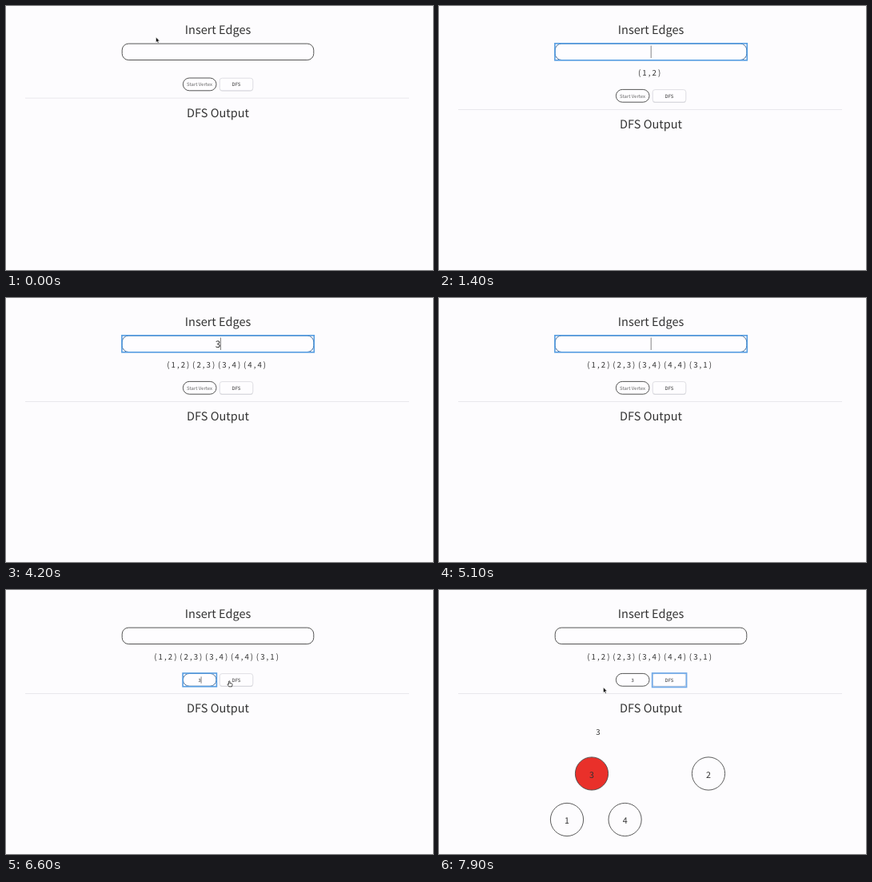
Recreate the animation shown at these times as an HTML page. Size 534 by 330 pixels, loop 8000 ms.

```html
<!DOCTYPE html>
<html lang="en">
<head>
<meta charset="utf-8">
<title>DFS demo</title>
<style>
html, body { margin: 0; width: 100%; height: 100%; overflow: hidden; background: #fdfcfe; }
svg { display: block; width: 100vw; height: 100vh; }
text {
  font-family: "Noto Sans CJK JP", "Noto Sans CJK SC", "Noto Sans CJK", "Open Sans", sans-serif;
  fill: #333; text-anchor: middle; white-space: pre; text-rendering: geometricPrecision;
}
.title { font-size: 14.5px; font-weight: 300; }
.small { font-size: 5.95px; }
.typed { font-size: 11.95px; text-anchor: start; }
.edge { font-size: 9.7px; letter-spacing: 2.05px; text-anchor: start; }
.node text { font-size: 10.7px; }
.node circle { fill: #fdfcfe; stroke: #4a4a4a; stroke-width: .9; }
.field { fill: #fefdff; stroke: #555; stroke-width: 1; }
.focus { stroke: #476f9d; }
.ring { fill: none; stroke: #559de2; stroke-width: 1.6; }
.caret { stroke: #777; stroke-width: .9; }
</style>
</head>
<body>
<svg viewBox="0 0 534 330">
  <text class="title" x="265" y="34.5">Insert Edges</text>
  <rect id="edgeField" class="field" x="145.2" y="47.1" width="239.6" height="20.4" rx="8"/>
  <rect id="edgeRing" class="ring" x="144.9" y="46.8" width="240.4" height="21"/>
  <text id="typed" class="typed" y="61.9"></text>
  <line id="edgeCaret" class="caret" y1="49.5" y2="65"/>
  <g id="edges"></g>

  <g id="lower">
    <rect id="startField" class="field" x="221.4" y="104.4" width="41.6" height="15.8" rx="7.8"/>
    <rect id="startRing" class="ring" x="221.1" y="104" width="42.3" height="16.7"/>
    <text id="startText" class="small" x="242.1" y="114.7"></text>
    <line id="startCaret" class="caret" y1="108.3" y2="116.7"/>
    <rect x="267.2" y="105.4" width="41.6" height="15.6" rx="3" fill="#d9d9de"/>
    <rect x="267.2" y="104.6" width="41.6" height="15.5" rx="3" fill="#fefdff" stroke="#d8d8dd" stroke-width=".8"/>
    <rect id="buttonRing" class="ring" x="266.7" y="104" width="42.8" height="17.4" style="stroke:#73abe8;stroke-width:1.8"/>
    <text class="small" x="288" y="114.7" style="font-weight:500">DFS</text>
    <line x1="24" x2="504" y1="129.5" y2="129.5" stroke="#e9e8ec"/>
    <text class="title" x="265" y="153">DFS Output</text>
  </g>

  <g id="graph">
    <text id="visited" x="199" y="180.6" style="font-size:9.6px">3</text>
  </g>

  <g id="pointer">
    <path id="arrow" d="M0 0V6.6L1.5 5.2 2.6 7.7 3.7 7.2 2.6 4.8H4.7Z" fill="#111" stroke="#fff" stroke-width=".5"/>
    <path id="beam" d="M-1.5-4Q0-4 0-3Q0-4 1.5-4M0-3V3M-1.5 4Q0 4 0 3Q0 4 1.5 4" fill="none" stroke="#222" stroke-width=".8"/>
    <path id="hand" d="M-.7 4.4V.5Q0-.4.7.5V2.8L3.2 3.4Q4 3.7 3.8 4.8L3.1 7.2H-.4L-2.3 4.6Q-2.2 3.6-1.4 3.9Z" fill="#fff" stroke="#222" stroke-width=".8"/>
  </g>
</svg>
<script>
const LOOP = 8000, TICK = 100, MID = 265;
const $ = id => document.getElementById(id);
const show = (id, on) => { $(id).style.display = on ? "" : "none"; };

function add(parent, tag, attrs, text = "") {
  const el = document.createElementNS("http://www.w3.org/2000/svg", tag);
  for (const k in attrs) el.setAttribute(k, attrs[k]);
  el.textContent = text;
  parent.append(el);
  return el;
}

// [time, text in the edge field]; "" after a pair means Enter
const typing = [
  [800, ""], [1000, "1"], [1100, "1 "], [1200, "1 2"], [1400, ""],
  [1600, "2"], [1700, "2 "], [1800, "2 3"], [1900, ""],
  [2100, "3"], [2400, "3 "], [2500, "3 4"], [2600, ""],
  [2700, "4"], [2800, "4 "], [3200, "4 4"], [3400, ""],
  [4200, "3"], [4600, "3 "], [4800, "3 1"], [5100, ""]
];
const enters = typing.filter((k, i) => i && k[1] === "");
const pairs = ["(1,2)", "(2,3)", "(3,4)", "(4,4)", "(3,1)"];
const PITCH = 31.9;

// [time, x, y, shape]
const moves = [
  [0, 187.5, 39, "arrow"], [200, 178, 40, "arrow"], [300, 167, 44, "arrow"],
  [400, 190, 52, "beam"], [500, 228, 53, "beam"], [600, 249, 54, "beam"],
  [1000, 0, 0, ""],
  [5400, 249, 57, "beam"], [5500, 247, 76, "arrow"], [5600, 244, 96, "arrow"],
  [5700, 242, 109, "beam"], [6300, 251, 112, "beam"], [6400, 262, 114, "beam"],
  [6500, 272, 114, "hand"], [6600, 279.3, 113.6, "hand"], [6700, 290, 114, "hand"],
  [6800, 302, 114, "hand"], [7300, 298, 114, "hand"], [7400, 288, 116, "hand"],
  [7500, 268, 120, "hand"], [7600, 245, 123, "arrow"], [7700, 226, 124, "arrow"],
  [7800, 213, 123, "arrow"], [7900, 205.5, 121.8, "arrow"]
];

const FOCUS_START = 6000, START_KEY = 6300, CLICK = 6900, VISIT = 7300;

const edges = pairs.map(p => add($("edges"), "text", { class: "edge", y: 87.4 }, p));
const discs = [[191, 229.5, 3], [337, 229.5, 2], [160, 287, 1], [232.6, 287, 4]].map(([x, y, n]) => {
  const g = add($("graph"), "g", { class: "node" });
  const disc = add(g, "circle", { cx: x, cy: y, r: 20.6 });
  add(g, "text", { x, y: y + 5 }, n);
  return disc;
});

const last = (list, t) => list.filter(k => k[0] <= t).pop();
const blink = (t, since) => (t - since) % 900 < 400;

function drawCaret(id, on, x) {
  show(id, on);
  $(id).setAttribute("x1", x);
  $(id).setAttribute("x2", x);
}

function drawEdgeField(t) {
  const focused = t >= 800 && t < FOCUS_START;
  const [since, text] = last(typing, t) || [0, ""];
  const width = [...text].reduce((w, c) => w + (c === " " ? 2.68 : 6.63), 0);
  $("edgeField").classList.toggle("focus", focused);
  show("edgeRing", focused);
  $("typed").textContent = text;
  $("typed").setAttribute("x", MID - width / 2);
  drawCaret("edgeCaret", focused && blink(t, since), MID + width / 2 + .2);

  const count = enters.filter(k => k[0] <= t).length;
  edges.forEach((el, i) => {
    el.style.display = i < count ? "" : "none";
    el.setAttribute("x", MID - count * PITCH / 2 + i * PITCH);
  });
  $("lower").setAttribute("transform", `translate(0 ${count ? 0 : -14.4})`);
}

function drawStart(t) {
  const focused = t >= FOCUS_START && t < CLICK, filled = t >= START_KEY;
  $("startField").classList.toggle("focus", focused);
  show("startRing", focused);
  $("startText").textContent = filled ? "3" : "Start Vertex";
  $("startText").style.fill = filled ? "#333" : "#666";
  drawCaret("startCaret", focused && blink(t, filled ? START_KEY : FOCUS_START), filled ? 244.1 : 242.1);
  show("buttonRing", t >= CLICK);
}

function drawGraph(t) {
  show("graph", t >= CLICK);
  show("visited", t >= VISIT);
  const k = Math.min(1, Math.max(0, (t - VISIT + TICK) / 400));
  const mix = (a, b) => Math.round(a + (b - a) * k);
  discs[0].style.fill = `rgb(${mix(253, 233)},${mix(252, 48)},${mix(254, 42)})`;
}

function drawPointer(t) {
  const [, x, y, shape] = last(moves, t);
  for (const id of ["arrow", "beam", "hand"]) show(id, id === shape);
  $("pointer").setAttribute("transform", `translate(${x} ${y})`);
}

const start = performance.now();
function frame(now) {
  const t = Math.floor((Math.max(0, now - start) % LOOP) / TICK) * TICK;
  drawEdgeField(t);
  drawStart(t);
  drawGraph(t);
  drawPointer(t);
  requestAnimationFrame(frame);
}
frame(start);
</script>
</body>
</html>
```
